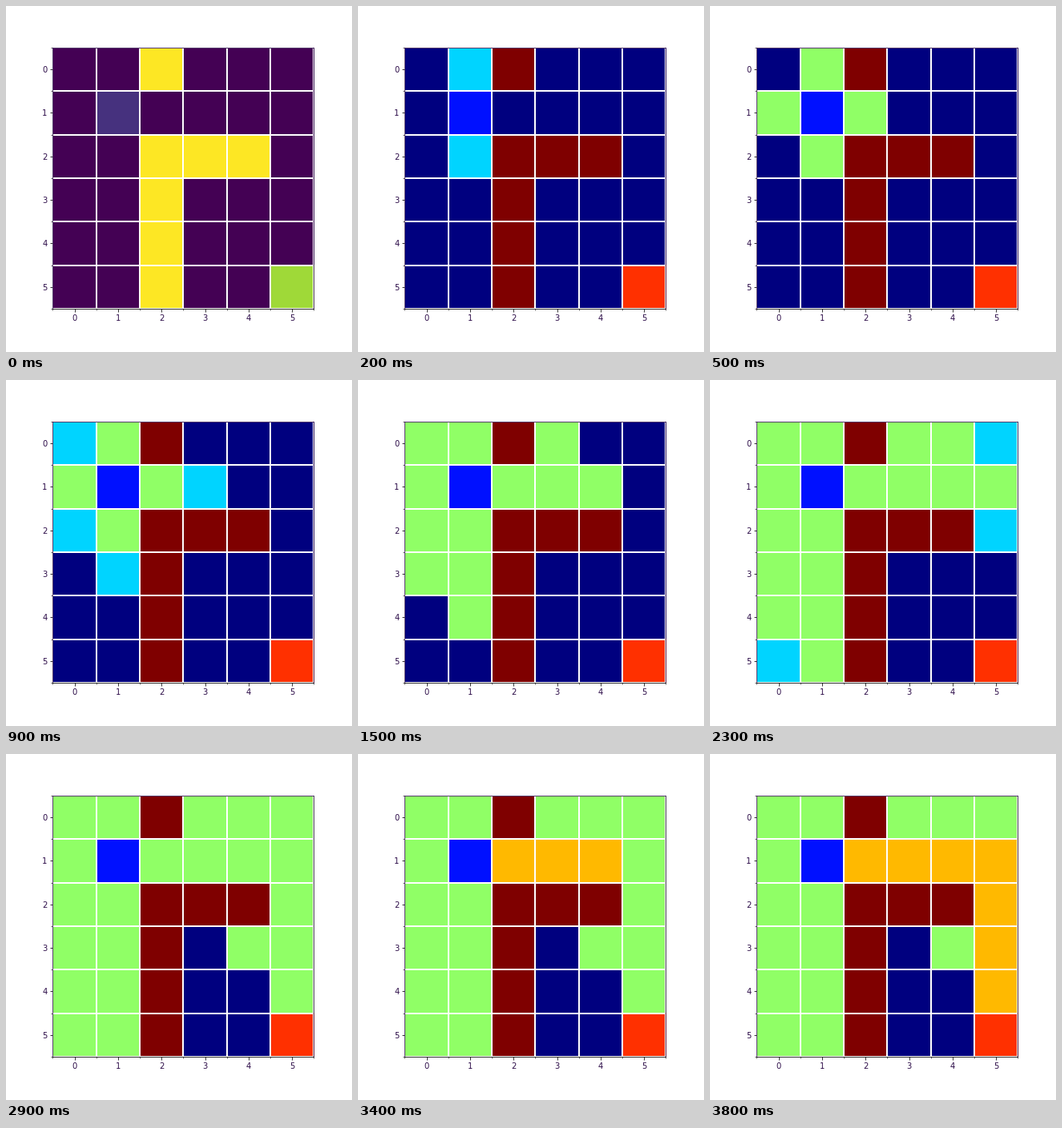
Animation, 432 px wide and 432 px high, one loop 3900 ms. Source, as a matplotlib script:

```python
import matplotlib.pyplot as plt
import numpy as np
from matplotlib.animation import FuncAnimation

SIZE = 6
FREE, START, OPEN, CLOSED, PATH, GOAL, WALL = 0, 3, 7, 11, 15, 18, 21
STEPS = [(-1, 0), (1, 0), (0, -1), (0, 1)]  # up, down, left, right
INK = "#2c0c48"


def make_maze():
    grid = np.full((SIZE, SIZE), FREE)
    grid[[0, 2, 3, 4, 5], 2] = WALL
    grid[2, 3:5] = WALL
    grid[1, 1] = START
    grid[5, 5] = GOAL
    return grid


def neighbours(cell):
    for dr, dc in STEPS:
        r, c = cell[0] + dr, cell[1] + dc
        if 0 <= r < SIZE and 0 <= c < SIZE:
            yield r, c


def search(start, goal):
    """Breadth-first search by layers, recording the grid after each change."""
    grid = make_maze()
    states = [grid.copy()]
    parent = {}
    layer = [start]
    while goal not in parent:
        fresh = []
        for cell in layer:
            for near in neighbours(cell):
                if near == goal:
                    parent[goal] = cell
                    break
                if grid[near] == FREE:
                    grid[near] = OPEN
                    parent[near] = cell
                    fresh.append(near)
                    states.append(grid.copy())
            if goal in parent:
                break
        else:
            for cell in fresh:
                grid[cell] = CLOSED
            states.append(grid.copy())
        layer = fresh

    states += [grid.copy()] * 2  # pause before the route appears
    route = []
    cell = parent[goal]
    while cell != start:
        route.append(cell)
        cell = parent[cell]
    for cell in reversed(route):
        grid[cell] = PATH
        states.append(grid.copy())
    return states


states = search((1, 1), (5, 5))

fig = plt.figure(figsize=(6, 6), dpi=72, facecolor="white")
ax = fig.add_axes([0.135, 0.125, 0.755, 0.755])
image = ax.imshow(states[0], vmin=FREE, vmax=WALL, interpolation="nearest")

ax.set_xticks(range(SIZE))
ax.set_yticks(range(SIZE))
ax.set_xticks(np.arange(-0.5, SIZE), minor=True)
ax.set_yticks(np.arange(-0.5, SIZE), minor=True)
ax.grid(which="minor", color="white", linewidth=2)
ax.tick_params(labelsize=10, labelcolor=INK, labelfontfamily="DejaVu Sans")
for side in ("left", "top", "right"):
    ax.spines[side].set_color(INK)


def draw(i):
    image.set_cmap("jet" if i else "viridis")
    image.set_data(states[i])
    return [image]


anim = FuncAnimation(fig, draw, frames=len(states), interval=100,
                     repeat=True, repeat_delay=0, blit=False)
plt.show()
```
